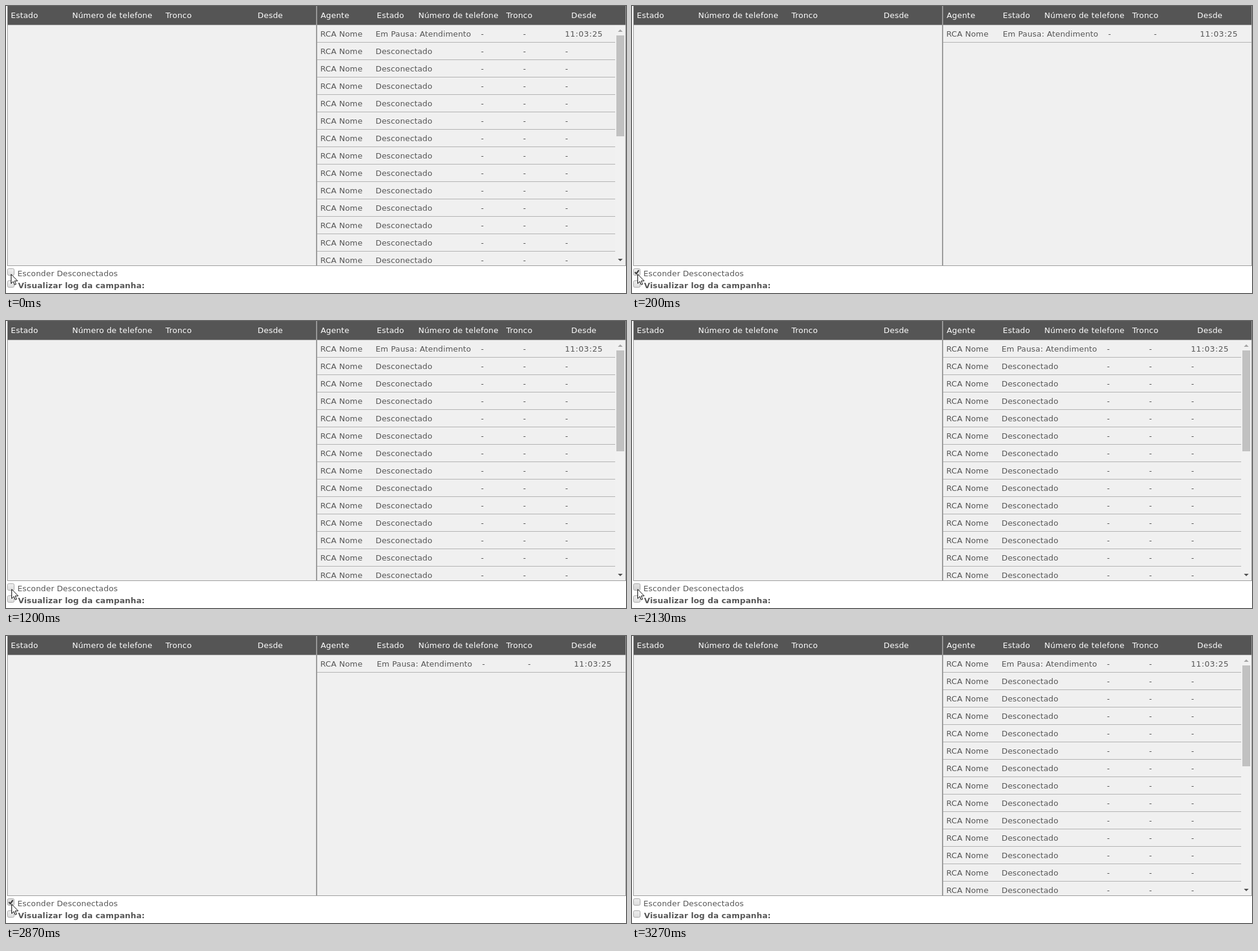
Write an HTML page that moves like this. It is 1030 px wide and 478 px high and loops after 3340 ms.

```html
<!DOCTYPE html>
<html lang="pt">
<head>
<meta charset="utf-8">
<style>
html, body { margin: 0; width: 100%; height: 100%; overflow: hidden; background: #fff }
svg { display: block; font: 13px "DejaVu Sans", Verdana, sans-serif; letter-spacing: .15px; fill: #555 }
.head { fill: #fff; letter-spacing: .2px }
.time { letter-spacing: .6px }
.bold { font-weight: bold }
.rule { fill: #b0b0b0 }
.border { fill: #999 }
</style>
</head>
<body>
<svg id="stage" width="1030" height="478" viewBox="0 0 1030 478">
  <defs>
    <linearGradient id="idle" x2="0" y2="1"><stop stop-color="#ededed"/><stop offset="1" stop-color="#dedede"/></linearGradient>
    <linearGradient id="hover" x2="0" y2="1"><stop stop-color="#f0f0f0"/><stop offset="1" stop-color="#dcdcdc"/></linearGradient>
    <linearGradient id="down" x2="0" y2="1"><stop stop-color="#e2e2e2"/><stop offset="1" stop-color="#d2d2d2"/></linearGradient>
    <clipPath id="panel"><rect x="517" y="32" width="512" height="400"/></clipPath>
  </defs>
  <rect x="2" y="32" width="1028" height="401" fill="#f0f0f0"/>
  <g clip-path="url(#panel)">
    <g id="full"></g>
    <g id="short"></g>
  </g>
  <g id="frame"></g>
  <rect id="box" x="2.5" y="437.5" width="11" height="11" rx="2" stroke="#a6a6a6"/>
  <path id="tick" d="M4.8 443.2 7.2 445.8 11.4 440" fill="none" stroke="#3c3c3c" stroke-width="2.3"/>
  <rect x="2.5" y="457.5" width="11" height="11" rx="2" fill="url(#idle)" stroke="#a6a6a6"/>
  <path id="cursor" d="M.5 .8V16.2L4 12.8 6.4 18.3 8.7 17.3 6.3 11.9H11.3Z" fill="#fff" stroke="#000"/>
</svg>
<script>
const $ = id => document.getElementById(id);
const text = (x, y, str, cls = '') => `<text x="${x}" y="${y}" class="${cls}">${str}</text>`;
const rect = (x, y, w, h, cls) => `<rect x="${x}" y="${y}" width="${w}" height="${h}" class="${cls}"/>`;

// One agent row: columns are state, phone, trunk and since
function row(i, [state, phone, trunk, since], width) {
  const y = 51 + 29 * i;
  return text(522.3, y, 'RCA Nome', 'name') +
    text(state, y, i ? 'Desconectado' : 'Em Pausa: Atendimento') +
    text(phone, y, '-') + text(trunk, y, '-') +
    (i ? text(since, y, '-') : text(since - .5, y, '11:03:25', 'time')) +
    rect(517, y + 9, width, 1, 'rule');
}

const wide = [614, 789, 859, 929];
$('full').innerHTML = Array.from({ length: 14 }, (_, i) => row(i, wide, 495)).join('') +
  `<path d="M1012 32h17v400h-17z" fill="#f1f1f1"/>
   <path d="M1014 49h13v168h-13z" fill="#c1c1c1"/>
   <path d="M1016.5 43 1020.5 39 1024.5 43z" fill="#a3a3a3"/>
   <path d="M1016.5 421 1020.5 425 1024.5 421z" fill="#505050"/>`;
$('short').innerHTML = row(0, [616, 791, 867, 944], 512);

const heads = [[8, 'Estado'], [110, 'Número de telefone'], [265, 'Tronco'], [418, 'Desde'],
  [522.7, 'Agente'], [616, 'Estado'], [685, 'Número de telefone'], [831, 'Tronco'], [939, 'Desde']];
$('frame').innerHTML = rect(2, 0, 1028, 31, '') + rect(2, 31, 1028, 1, 'border') +
  [2, 515, 516, 1029].map(x => rect(x, 0, 1, 433, 'border')).join('') +
  rect(2, 432, 1028, 1, 'border') +
  heads.map(([x, str]) => text(x, 20, str, 'head')).join('') +
  text(19, 450, 'Esconder Desconectados') +
  text(20, 470, 'Visualizar log da campanha:', 'bold');

const show = (id, on) => $(id).setAttribute('visibility', on ? 'visible' : 'hidden');
const within = (t, spans) => spans.some(([a, b]) => t >= a && t < b);

function draw(now) {
  const t = now % 3340;
  const checked = within(t, [[200, 1200], [2200, 3000]]);
  const pressed = within(t, [[70, 200], [1130, 1200], [2130, 2200], [2870, 3000]]);
  const leaving = t >= 3200;
  show('full', !checked);
  show('short', checked);
  show('tick', checked);
  show('cursor', t < 3270);
  $('box').setAttribute('fill', `url(#${pressed ? 'down' : leaving ? 'idle' : 'hover'})`);
  const [x, y] = leaving ? [0, 421] : [t < 70 ? 8 : 9, 446];
  $('cursor').setAttribute('transform', `translate(${x} ${y})`);
}

const start = performance.now();
function tick() {
  draw(performance.now() - start);
  requestAnimationFrame(tick);
}
tick();
</script>
</body>
</html>
```
